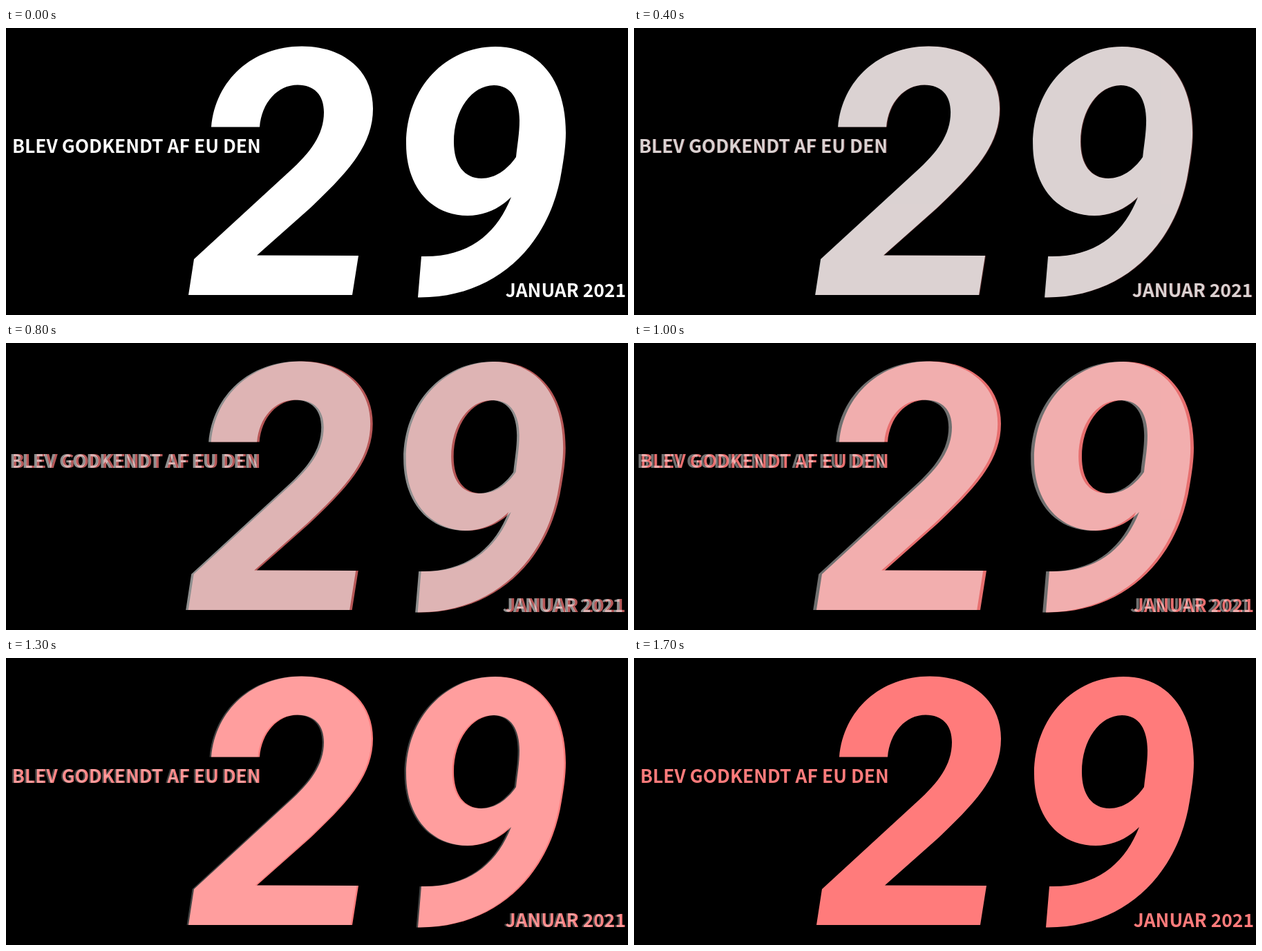
An HTML page that plays this animation: 900 px wide and 416 px high, repeating every 3900 ms.

```html
<!DOCTYPE html>
<html lang="da">
<head>
<meta charset="utf-8">
<title>29 januar 2021</title>
<style>
  html, body { margin: 0; width: 100%; height: 100%; overflow: hidden; background: #000; }
  svg { display: block; width: 900px; height: 416px; }
  text { font: 600 26.5px "Noto Sans CJK JP", "Noto Sans CJK SC", "Noto Sans CJK", "Open Sans", sans-serif; }
</style>
</head>
<body>
<svg viewBox="0 0 900 416">
  <defs>
    <g id="card">
      <path d="M297 143.5 C303 75 357 26.5 428 26.5 C490 26.5 531 63 531 117
        C531 170 495 209 439 262 L363 329.5 L510 330 L501 387 H264 L272 335 L410 208
        C440 181 460 155 460 122 C460 97 446 82.5 422 82.5 C393 82.5 370 108 367 143.5 Z"/>
      <path fill-rule="evenodd" d="M596 390.5 L601 331 C670 333 710 298 731 245
        C714 262 692 272 668 272 C614 272 579 229 579 168 C579 86 637 27 708 27
        C772 27 810 76 810 152 C810 170 807 190 804 207 C788 311 712 392 596 390.5 Z
        M738 187 C725 206 707 218 688 218 C663 218 648 198 648 165
        C648 119 674 83 706 83 C731 83 743 104 743 134 C743 152 740 168 738 187 Z"/>
      <text id="lead" x="9" y="181">BLEV GODKENDT AF EU DEN</text>
      <text id="date" x="897" y="390" text-anchor="end">JANUAR 2021</text>
    </g>
  </defs>
  <use id="red" href="#card" fill="#ff7b7b"/>
  <use id="white" href="#card" fill="#fff"/>
</svg>
<script>
  const LOOP = 3900, STEP = 100, END = 1700;
  const $ = id => document.getElementById(id);

  // Tracks are [time in ms, value] pairs with straight lines between them.
  const layers = [
    { el: $('red'),
      alpha: [[0, 0], [50, 0], [1100, 1]],
      shift: [[0, -1.5], [1000, 0]] },
    { el: $('white'),
      alpha: [[0, 1], [50, 1], [1600, 0.085], [1700, 0]],
      shift: [[0, 0], [1000, -4.8], [1600, 0]] }
  ];

  function valueAt(track, t) {
    for (let i = 1; i < track.length; i++) {
      const [t0, v0] = track[i - 1], [t1, v1] = track[i];
      if (t < t1) return v0 + (v1 - v0) * (t - t0) / (t1 - t0);
    }
    return track[track.length - 1][1];
  }

  // One type size for both lines, chosen from the length of the first.
  const size = 26.5 * 360 / $('lead').getComputedTextLength();
  if (isFinite(size)) for (const id of ['lead', 'date']) $(id).style.fontSize = size + 'px';

  function draw(now) {
    const t = Math.min(END, Math.floor((now % LOOP) / STEP) * STEP);
    for (const { el, alpha, shift } of layers) {
      el.setAttribute('opacity', valueAt(alpha, t));
      el.setAttribute('transform', `translate(${valueAt(shift, t)} 0)`);
    }
  }

  const start = performance.now();
  function tick() {
    draw(performance.now() - start);
    requestAnimationFrame(tick);
  }
  tick();
</script>
</body>
</html>
```
